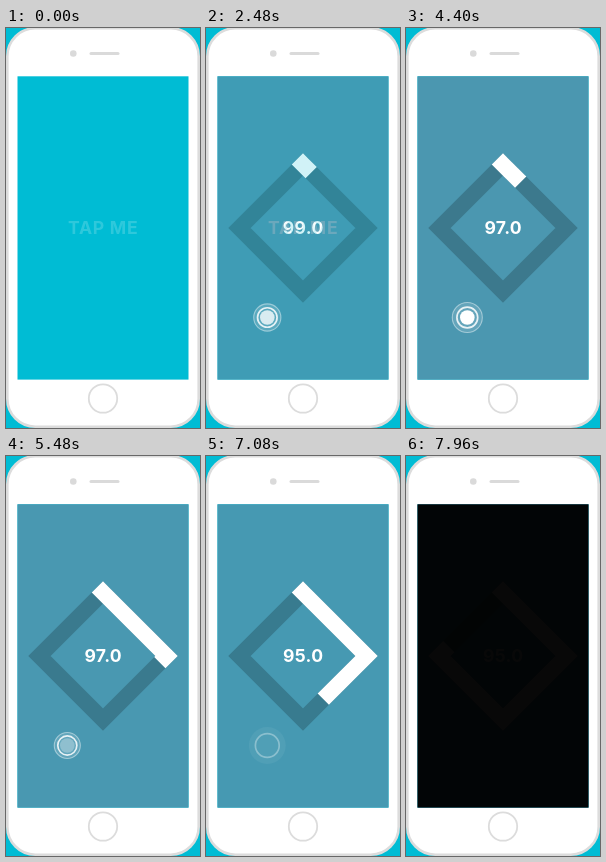
Recreate the animation shown at these times as an HTML page. Size 194 by 400 pixels, loop 8000 ms.

```html
<!DOCTYPE html>
<html lang="en">
<head>
<meta charset="utf-8">
<title>Tap tempo</title>
<style>
  html, body { margin: 0; width: 100%; height: 100%; overflow: hidden; background: #00bcd4; }
  svg { display: block; width: 194px; height: 400px; }
  text {
    font: 700 17.6px Inter, "Open Sans", sans-serif;
    text-anchor: middle;
    fill: #fff;
  }
  .shell { fill: #fff; stroke: #dcdcdc; stroke-width: 2.6; }
  .diamond { fill: none; stroke-width: 15.9; }
</style>
</head>
<body>
<svg viewBox="0 0 194 400">
  <rect class="shell" x="1.3" y="0.3" width="191.4" height="398.4" rx="28"/>
  <circle cx="67.3" cy="25.5" r="3.3" fill="#dadada"/>
  <path d="M85 25.5H112" stroke="#dadada" stroke-width="3" stroke-linecap="round"/>
  <circle cx="97" cy="370.5" r="14.2" fill="#fff" stroke="#dcdcdc" stroke-width="1.8"/>

  <rect x="11.5" y="48.3" width="171" height="303.3" fill="#00bcd4"/>
  <text id="prompt" x="97.2" y="206.4" letter-spacing=".75">TAP ME</text>

  <g id="meter">
    <rect id="back" x="11.5" y="48.3" width="171" height="303.3"/>
    <path class="diamond" d="M97 136.5L160.5 200L97 263.5L33.5 200Z" stroke="#000" stroke-opacity=".2"/>
    <path class="diamond" id="bar" d="M97 136.5L160.5 200L97 263.5L33.5 200L97 136.5" pathLength="4" stroke="#fff" stroke-linecap="square"/>
    <text id="bpm" x="97.2" y="206.4" letter-spacing=".3"></text>
  </g>

  <g id="touch" transform="translate(61.3 289.5)">
    <circle id="halo" fill="#fff" stroke="#fff" stroke-width="1.1"/>
    <circle id="ring" fill="none" stroke="#fff" stroke-width="1.7"/>
    <circle id="dot" r="7.3" fill="#fff"/>
  </g>
  <rect id="shade" x="11.5" y="48.3" width="171" height="303.3" opacity="0"/>
</svg>
<script>
  const LOOP = 8000, STEP = 40, SIDE = 600;
  const FIRST_TAP = 2060;
  // [time, tempo shown from that tap on]
  const beats = [[FIRST_TAP, ''], [2456, '99.0'], [3066, '99.0'], [3675, '98.0'],
                 [4286, '97.0'], [4870, '97.0'], [5490, '96.0'], [6125, '95.0']];
  const taps = [...beats.map(b => b[0]), 6750];

  const $ = id => document.getElementById(id);
  const set = (id, attrs) => {
    for (const k in attrs) $(id).setAttribute(k, attrs[k]);
  };
  const ramp = (t, a, b) => Math.min(1, Math.max(0, (t - a) / (b - a)));
  const mix = (a, b, p) => a + (b - a) * p;

  function drawPrompt(t) {
    const rise = Math.sin(ramp(t, 0, 1480) * Math.PI / 2);
    const press = 0.06 * ramp(t, 1880, 1960);
    set('prompt', { opacity: mix(0.18, 1, rise) - press });
  }

  function drawMeter(t) {
    const p = ramp(t, 2120, 2560);
    const [start, tempo] = beats.findLast(b => b[0] <= t) || beats[0];
    const drift = ramp(t, 3160, 7080);
    const rgb = [[78, 70], [150, 153], [175, 178]].map(([a, b]) => Math.round(mix(a, b, drift)));
    set('meter', { opacity: p });
    set('back', { fill: `rgb(${rgb})` });
    set('bar', { 'stroke-dasharray': `${Math.max(0.001, (t - start) / SIDE)} 9` });
    $('bpm').textContent = tempo;
  }

  function drawTouch(t) {
    const holding = t < 2120;
    const tap = taps.findLast(x => x - 50 <= t) || FIRST_TAP;
    const age = holding ? 60 : t - tap;
    const gone = 1 - ramp(age, 130, 460);
    const rings = holding ? 0 : ramp(age, -60, -20) * gone;
    const dot = holding
      ? ramp(t, 1880, 1960)
      : ramp(age, -30, 40) * (1 - ramp(age, 150, 300));
    set('halo', {
      r: 13.2 + 0.016 * age,
      'fill-opacity': 0.14 * rings,
      'stroke-opacity': 0.45 * rings * (1 - ramp(age, 130, 330))
    });
    set('ring', { r: 9.6 + 0.007 * age, opacity: 0.85 * rings });
    set('dot', { opacity: dot });
  }

  function frame(now) {
    const t = Math.floor(now % LOOP / STEP + 0.01) * STEP;
    drawPrompt(t);
    drawMeter(t);
    drawTouch(t);
    set('shade', { opacity: ramp(t, 7500, 7975) });
    requestAnimationFrame(frame);
  }

  frame(0);
</script>
</body>
</html>
```
